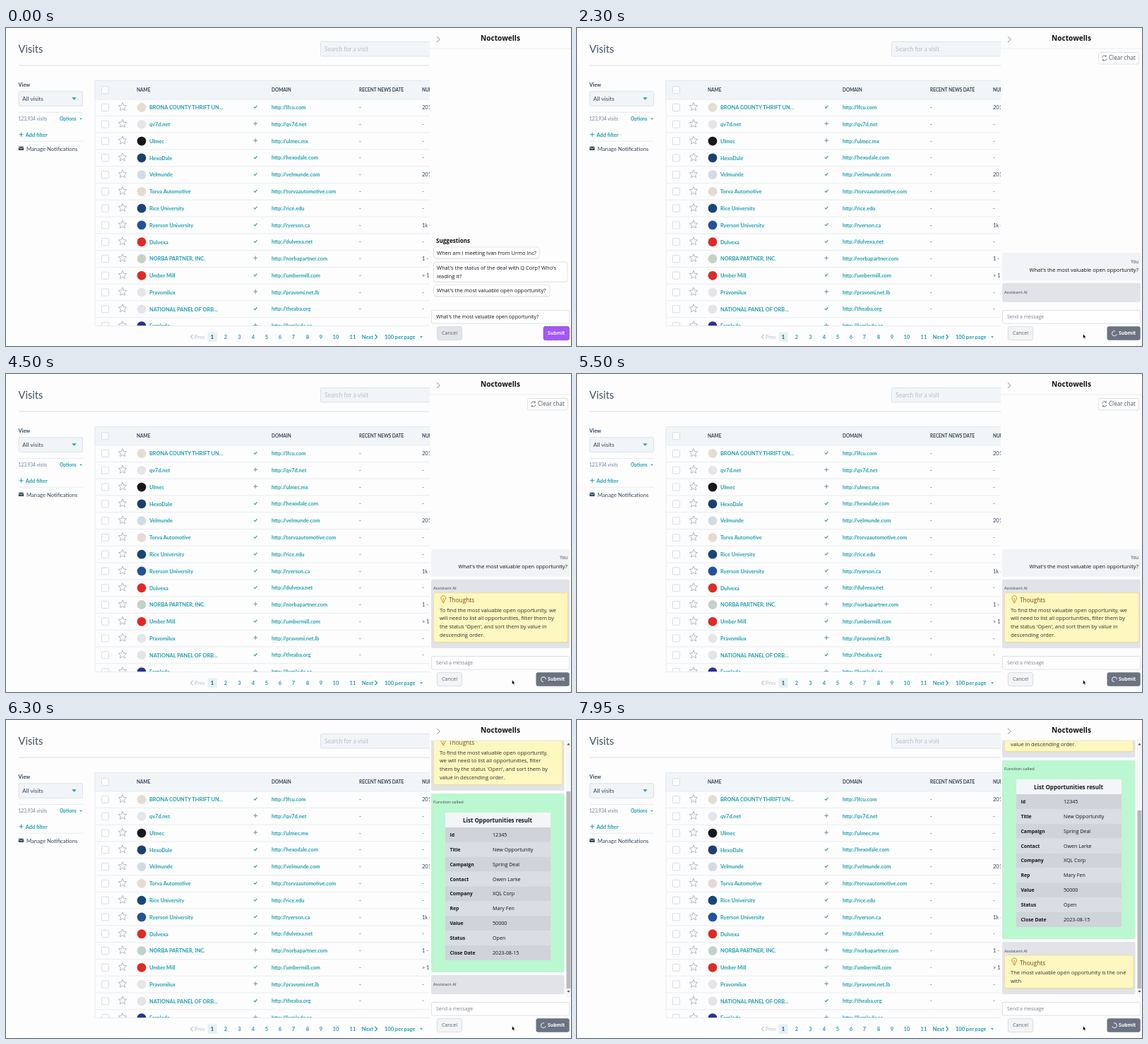
An HTML page for the animation above (8000 ms loop, 800 by 450 pixels).

```html
<!DOCTYPE html>
<html lang="en">
<head>
<meta charset="utf-8">
<title>Visits</title>
<style>
  html, body { margin: 0; width: 100%; height: 100%; overflow: hidden; background: #fdfdfe; }
  svg { display: block; width: 800px; height: 450px; }
  #page { font-family: Lato, sans-serif; }
  #panel { font-family: "Open Sans", "Noto Sans", sans-serif; }
  text { white-space: pre; }
</style>
</head>
<body>
<svg viewBox="0 0 800 450">
  <defs><clipPath id="view"><rect x="600" y="29.5" width="200" height="364"/></clipPath></defs>
  <g id="page"></g>
  <g id="panel">
    <g id="frame"></g>
    <g id="chat" clip-path="url(#view)"></g>
    <g id="form"></g>
    <path id="spinner" d="M0-3.4A3.4 3.4 0 1 1-3.4 0" fill="none" stroke="#e8eaee" stroke-width="1.1"/>
    <path id="cursor" d="M0 0V6.2L1.5 4.9L2.5 7.1L3.5 6.6L2.5 4.5H4.4Z" fill="#000" stroke="#fff" stroke-width=".5"/>
  </g>
</svg>
<script>
const LOOP = 8000;
const BACK = '#fdfdfe', TEAL = '#1f9fb0', INK = '#33475b', EDGE = '#d3dce6', PALE = '#f2f5f8';
const DARK = '#111318', GREY = '#6b7280';
const $ = id => document.getElementById(id);

const text = (x, y, str, size, fill, { weight = 400, anchor = 'start' } = {}) =>
  `<text x="${x}" y="${y}" font-size="${size}" fill="${fill}" font-weight="${weight}" text-anchor="${anchor}">${str}</text>`;
const box = (x1, y1, x2, y2, fill, stroke = 'none', r = 0) =>
  `<rect x="${x1}" y="${y1}" width="${x2 - x1}" height="${y2 - y1}" rx="${r}" fill="${fill}" stroke="${stroke}" stroke-width=".8"/>`;
const path = (d, stroke, width = 1, fill = 'none') =>
  `<path d="${d}" fill="${fill}" stroke="${stroke}" stroke-width="${width}" stroke-linejoin="round"/>`;
const rule = (x1, x2, y, color = '#e1e7ed') => path(`M${x1} ${y}H${x2}`, color, .8);
const caret = (x, y, w) => path(`M${x - w} ${y - w / 2}h${2 * w}l${-w} ${w * 1.1}z`, 'none', 0, TEAL);
const bold = { weight: 700 };

// name, domain, icon colour, is a contact (check) or not (plus), last column
const ROWS = [
  ['BRONA COUNTY THRIFT UN…', 'lfcu.com', '#e4ddd3', 1, '201'],
  ['qv7d.net', 'qv7d.net', '#e3e5e8', 0, '-'],
  ['Ulmec', 'ulmec.mx', '#15171a', 0, '-'],
  ['HexoDale', 'hexodale.com', '#1b4070', 1, '-'],
  ['Velmunde', 'velmunde.com', '#d3dce6', 1, '201'],
  ['Torva Automotive', 'torvaautomotive.com', '#e4dbd8', 1, '-'],
  ['Rice University', 'rice.edu', '#17467c', 1, '-'],
  ['Ryerson University', 'ryerson.ca', '#21529a', 1, '1k -'],
  ['Dulvexa', 'dulvexa.net', '#df2a26', 1, '-'],
  ['NORBA PARTNER, INC.', 'norbapartner.com', '#c3d2c8', 0, '1 -'],
  ['Umber Mill', 'umbermill.com', '#df2a26', 1, '&gt; 1'],
  ['Pravomilux', 'pravomi.net.lb', '#e3e5e8', 0, '-'],
  ['NATIONAL PANEL OF ORB…', 'theaba.org', '#e3e5e8', 1, '-'],
  ['Fernlode', 'fernlode.ca', '#2b3190', 0, '-'],
];

function star(cx, cy) {
  const points = Array.from({ length: 10 }, (_, i) => {
    const r = i % 2 ? 2.8 : 6.1, a = i * Math.PI / 5;
    return `${(cx + r * Math.sin(a)).toFixed(2)} ${(cy - r * Math.cos(a)).toFixed(2)}`;
  });
  return path(`M${points.join('L')}Z`, '#9aa9b8', .8);
}

const checkbox = y => box(135.5, y - 5, 145.5, y + 5, '#fff', '#cbd5df', 1);

function row([name, domain, color, known, count], i) {
  const y = 112.5 + 23.78 * i;
  const mark = known
    ? path(`M350.9 ${y - .8}l1.6 1.7l3-3.5`, '#4a9c9d', 1.2)
    : path(`M350.3 ${y - 1}h5.8M353.2 ${y - 3.9}v5.8`, '#7f9fb0', 1.2);
  return checkbox(y) + star(165, y - .8) + `<circle cx="192" cy="${y}" r="6.4" fill="${color}"/>` +
    text(203, y + 2.8, name, 7.4, TEAL, bold) + mark +
    text(376, y + 2.6, 'http://' + domain, 7.4, TEAL, bold) +
    text(500, y + 2.6, '-', 7.5, INK) + text(589, y + 2.6, count, 7.5, INK) +
    rule(126, 600, y + 11.9);
}

function drawPage() {
  const heads = [[185, 'NAME'], [376, 'DOMAIN'], [500, 'RECENT NEWS DATE'], [589, 'NUMBER']];
  const pages = [292, 311, 330.5, 350, 369, 388, 407, 427, 446, 467, 491];
  $('page').innerHTML =
    box(0, 0, 800, 450, BACK) +
    text(17.5, 35, 'Visits', 14.6, '#405163') +
    box(445.5, 19.5, 610, 40, PALE, EDGE, 1.5) + text(451, 33, 'Search for a visit', 8.6, '#b3bfcb') +
    rule(18, 600, 53, '#cfd7df') +
    text(17.5, 83, 'View', 7.3, INK, bold) +
    box(18, 89.8, 108.5, 110.3, PALE, EDGE, 1.5) +
    text(23, 102.8, 'All visits', 8.3, INK) + caret(96.5, 99.8, 3.2) +
    rule(18, 109, 119.5) + text(17.5, 131, '123,934 visits', 6.6, '#6f8294') +
    text(76, 131, 'Options', 6.6, TEAL, bold) + caret(106, 128.7, 1.9) +
    path('M18.5 150.8h6M21.5 147.8v6', TEAL, 1) + text(27.8, 153.5, 'Add filter', 7.4, TEAL, bold) +
    rule(18, 109, 160.2) +
    box(17.8, 167.8, 25, 173, INK, 'none', .6) + path('M18 168.6l3.4 2.5l3.4-2.5', '#fff', .7) +
    text(29, 173.6, 'Manage Notifications', 7.7, INK) +
    box(126, 74.5, 610, 430, BACK, '#e1e7ed') + box(126, 74.5, 610, 101, PALE, '#e1e7ed') +
    checkbox(87.8) + heads.map(([x, s]) => text(x, 90, s, 6.5, INK, bold)).join('') +
    ROWS.map(row).join('') +
    box(100, 421.5, 620, 450, BACK) + rule(126, 600, 421.5) +
    path('M264.5 433.8l-3 3.3l3 3.3', '#b6c2ce', 1.2) + text(266.8, 439.8, 'Prev', 7.6, '#b6c2ce') +
    box(285.7, 430.3, 298.7, 444, '#e2f3f5', 'none', 1.5) +
    pages.map((x, i) => text(x, 439.8, i + 1, 7.6, i ? TEAL : INK, { weight: 700, anchor: 'middle' })).join('') +
    text(503.8, 439.8, 'Next', 7.5, TEAL, bold) + path('M522.5 433.8l3 3.3l-3 3.3', TEAL, 1.3) +
    text(536, 439.8, '100 per page', 7.5, TEAL, bold) + caret(588, 437.3, 2);
}

const CLICK = 300, REPLY = 1900, THOUGHT = 2690, CALLED = 5800, REPLY_2 = 6050, THOUGHT_2 = 7430;
const TOKEN = 54, LINE = 11.6, BOTTOM = 388, GAP = 4;
const QUESTION = "What's the most valuable open opportunity?";
const PLAN = ['To find the most valuable open opportunity, we', 'will need to list all opportunities, filter them by',
  "the status 'Open', and sort them by value in", 'descending order.'];
const PLAN_NARROW = ['To find the most valuable open opportunity,', 'we will need to list all opportunities, filter',
  "them by the status 'Open', and sort them by", 'value in descending order.'];
const ANSWER = ['The most valuable open opportunity is the one', 'with'];
const RESULT = [['Id', '12345'], ['Title', 'New Opportunity'], ['Campaign', 'Spring Deal'], ['Contact', 'Owen Larke'],
  ['Company', 'XQL Corp'], ['Rep', 'Mary Fen'], ['Value', '50000'], ['Status', 'Open'], ['Close Date', '2023-08-15']];

const chatText = (x, y, str, fill = DARK, anchor = 'start') => text(x, y, str, 7.5, fill, { weight: 500, anchor });

const tokensAt = (t, start) => Math.max(0, Math.floor((t - start - 44) / TOKEN) + 1);

// The part of the wrapped lines that the first `count` tokens cover.
function typed(lines, count) {
  const out = [];
  for (const line of lines) {
    const tokens = line.match(/ ?[\w']+|[,.]/g);
    if (count > 0) out.push(tokens.slice(0, count).join(''));
    count -= tokens.length;
  }
  return out;
}

const userMessage = right => ({
  h: 39,
  draw: y => box(602, y, right, y + 39, '#f1f3f6', 'none', 2) +
    text(right - 3, y + 14.5, 'You', 6.2, '#374151', { anchor: 'end' }) +
    chatText(right - 3, y + 27, QUESTION, DARK, 'end'),
});

function assistantMessage(right, lines) {
  const h = lines ? 50.8 + LINE * Math.max(1, lines.length) : 27;
  const bulb = y => path(`M617.6 ${y + 3}v-1.6a3.4 3.4 0 1 1 3.2 0v1.6zM617.8 ${y + 4.6}h2.8M619.2 ${y + 1}v-3`, '#b9821a', .9);
  const thoughts = y => box(605.8, y + 19.8, right - 2.2, y + h - 7.7, '#d3d2c4', 'none', 2.5) +
    box(605.4, y + 19, right - 2.6, y + h - 8.5, '#fef7c0', '#eddf8a', 2.5) + bulb(y + 28) +
    text(627, y + 32.6, 'Thoughts', 8.25, '#75480d') +
    lines.map((s, i) => chatText(614, y + 46 + LINE * i, s, '#2e2e28')).join('');
  return {
    h,
    draw: y => box(602, y, right, y + h, '#e1e3e8', 'none', 2) +
      text(605, y + 14.6, 'Assistant AI', 6.1, '#374151') + (lines ? thoughts(y) : ''),
  };
}

const resultMessage = right => ({
  h: 253,
  draw: y => box(602, y, right, y + 253, '#bbf7d0', 'none', 2) +
    text(605, y + 14.4, 'Function called', 6.1, '#374151') +
    box(622, y + 27, 771, y + 48.5, '#f4f5f7', 'none', 1) +
    text(696, y + 41, 'List Opportunities result', 8, '#111827', { weight: 700, anchor: 'middle' }) +
    RESULT.map(([key, value], i) => {
      const top = y + 48 + 20.87 * i;
      return box(622, top, 771, top + 20.87, i % 2 ? '#dadde4' : '#d0d3da') +
        text(628.5, top + 13, key, 6.85, DARK, bold) + text(689, top + 13, value, 7.15, DARK);
    }).join(''),
});

function scrollbar(contentHeight) {
  const thumb = 341 * 360 / contentHeight;
  return box(793, 29.5, 800, 393, '#f6f6f7') + box(793.6, 380 - thumb, 799.4, 380, '#b9babd') +
    path('M794.3 35.5l2.2-2.8l2.2 2.8zM794.3 383l2.2 2.8l2.2-2.8z', 'none', 0, '#555');
}

function suggestions() {
  const chip = (right, top, ...lines) => {
    const bottom = top + 16 + 12 * (lines.length - 1);
    return box(605.5, top + 1, right, bottom + 1, '#e9eaed', 'none', 3) + box(605.5, top, right, bottom, '#fff', '#dcdee3', 3) +
      lines.map((s, i) => chatText(610, top + 10.5 + 11.8 * i, s)).join('');
  };
  return text(609, 304, 'Suggestions', 8.1, '#111', bold) +
    chip(755, 310, 'When am I meeting Ivan from Urmo Inc?') +
    chip(795, 331.2, "What's the status of the deal with Q Corp? Who's", 'leading it?') +
    chip(770, 363.6, QUESTION);
}

function chat(t) {
  if (t < CLICK) return suggestions();
  const full = t >= CALLED, right = full ? 790.5 : 798;
  const items = [userMessage(right)];
  if (t >= REPLY)
    items.push(assistantMessage(right, t >= THOUGHT && typed(full ? PLAN_NARROW : PLAN, tokensAt(t, THOUGHT))));
  if (full) items.push(resultMessage(right));
  if (t >= REPLY_2)
    items.push(assistantMessage(right, t >= THOUGHT_2 && typed(ANSWER, tokensAt(t, THOUGHT_2))));
  let y = BOTTOM + GAP, out = '';
  for (const item of items.reverse()) {
    y -= item.h + GAP;
    out += item.draw(y);
  }
  const clear = full ? '' : box(738.5, 34.5, 795.5, 51, '#fff', '#d6d9df', 2.5) +
    path('M743.8 41.6a3 3 0 0 1 5.4-1.4v-1.6m0 1.7h-1.7M749.8 43.6a3 3 0 0 1-5.4 1.4v1.6m0-1.7h1.7', '#4b5563', .8) +
    text(753, 45.4, 'Clear chat', 8.1, '#4b5563');
  return out + clear + (full ? scrollbar(BOTTOM - y + 12) : '');
}

function form(sent) {
  const submit = sent ? box(750.5, 422.3, 797.7, 441.7, GREY, 'none', 3) : box(761, 422.3, 797.7, 441.7, '#a259f5', 'none', 3) +
    `<rect x="761" y="422.3" width="36.7" height="19.4" rx="3" fill="none" stroke="#4c1d95" stroke-dasharray="1 1.5"/>`;
  return box(602.5, 399.5, 797.7, 418, '#fff', '#d5d8de', 1.5) +
    text(609, 411.3, sent ? 'Send a message' : QUESTION, sent ? 6.95 : 7.05, sent ? '#7b8290' : DARK, { weight: sent ? 400 : 500 }) +
    box(610.4, 422.4, 645.6, 441.6, sent ? '#f3f4f6' : '#e3e4e8', '#d1d5db', 3) +
    text(628, 434.4, 'Cancel', 7.1, '#5b6270', { anchor: 'middle' }) +
    submit + text(767, 434.4, 'Submit', 6.8, sent ? '#fff' : '#fbe9ff', bold);
}

function drawFrame() {
  $('frame').innerHTML = box(600, 0, 800, 450, BACK) + path('M610 12l4.3 4l-4.3 4', '#7d8590', .9) +
    text(700, 18.4, 'Noctowells', 10.1, '#111', { weight: 700, anchor: 'middle' }) +
    rule(600, 800, 29, '#e6e8ec');
}

const shown = {};
function update(id, html) {
  if (shown[id] !== html) $(id).innerHTML = shown[id] = html;
}

function render(t) {
  const sent = t >= CLICK;
  update('chat', chat(t));
  update('form', form(sent));
  $('spinner').setAttribute('visibility', sent ? 'visible' : 'hidden');
  $('spinner').setAttribute('transform', `translate(761 432.3) rotate(${t * .36 % 360})`);
  const p = Math.min(1, Math.max(0, (t - 900) / 700)), e = p * p * (3 - 2 * p);
  $('cursor').setAttribute('visibility', sent ? 'visible' : 'hidden');
  $('cursor').setAttribute('transform', `translate(${783 - 66.5 * e} ${436 - 3 * e})`);
}

drawPage();
drawFrame();
const start = performance.now();
function tick() {
  render((performance.now() - start) % LOOP);
  requestAnimationFrame(tick);
}
tick();
</script>
</body>
</html>
```
